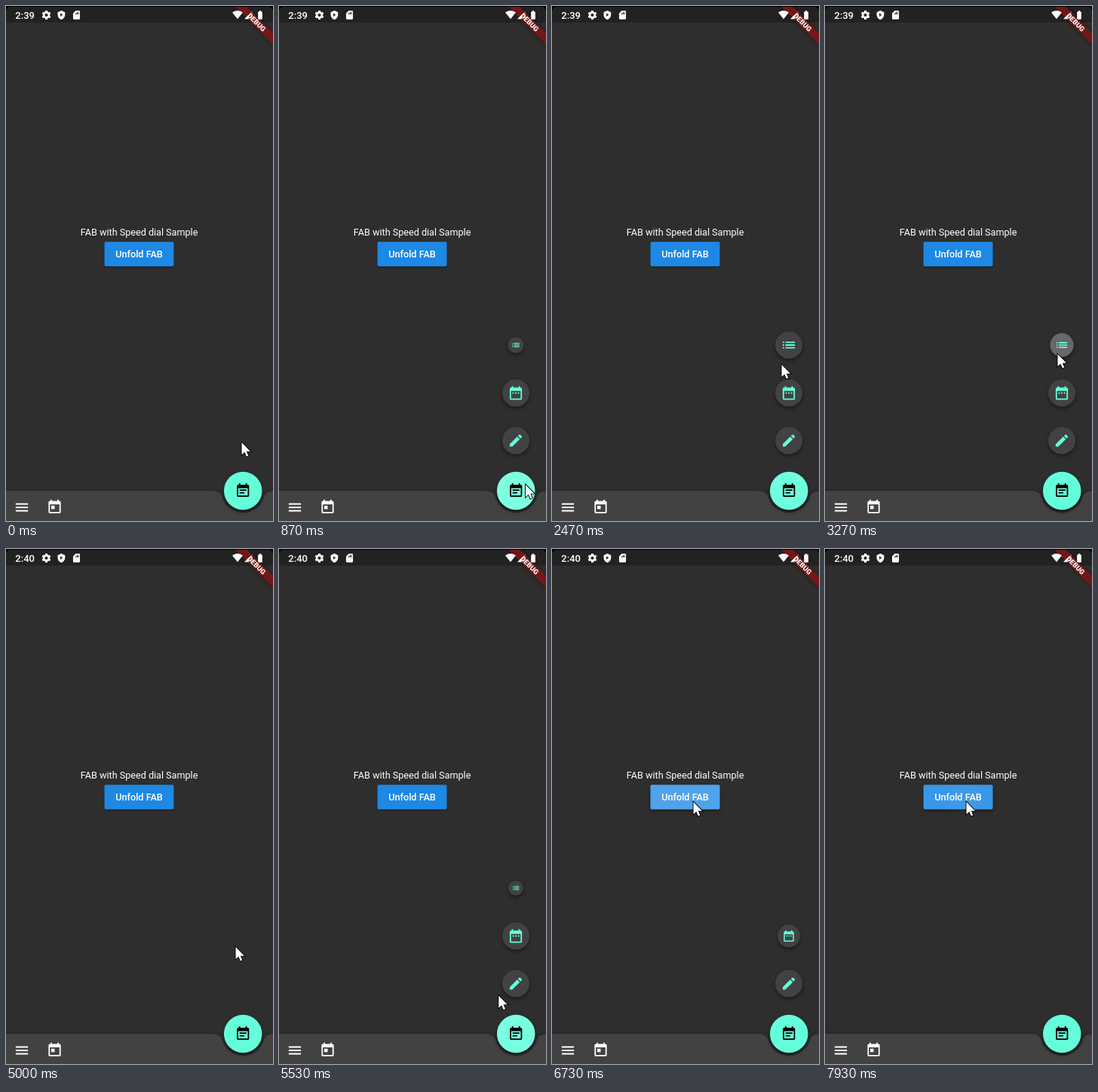
Write an HTML page with a canvas that moves like this. It is 354 px wide and 682 px high and loops after 8 s.

```html
<!DOCTYPE html>
<html lang="en">
<head>
<meta charset="utf-8">
<title>Speed dial</title>
<style>
  html, body { margin: 0; width: 100%; height: 100%; overflow: hidden; background: #000; }
  canvas { display: block; width: 354px; height: 682px; }
</style>
</head>
<body>
<canvas id="stage"></canvas>
<script>
const W = 354, H = 682, LOOP = 8000, STEP = 200 / 3;
const DP = 0.9015;
const TEAL = '#64ffda', SURFACE = '#424242', BODY = '#2e2e2e';
const FONT = 'Roboto, sans-serif';

const canvas = document.getElementById('stage');
const ctx = canvas.getContext('2d');
const dpr = window.devicePixelRatio || 1;
canvas.width = W * dpr;
canvas.height = H * dpr;

const PAGE = 'M19 3h-1V1h-2v2H8V1H6v2H5c-1.1 0-2 .9-2 2v14c0 1.1.9 2 2 2h14c1.1 0 2-.9 2-2V5c0-1.1-.9-2-2-2zM19 19H5V8h14z';
const icons = {
  menu: 'M3 6h18v2H3zM3 11h18v2H3zM3 16h18v2H3z',
  today: PAGE + 'M7 10h5v5H7z',
  note: PAGE + 'M7 10h10v2H7zM7 14h7v2H7z',
  list: 'M3 7h2v2H3zM3 11h2v2H3zM3 15h2v2H3zM7 7h14v2H7zM7 11h14v2H7zM7 15h14v2H7z',
  range: 'M19 4h-1V2h-2v2H8V2H6v2H5c-1.1 0-2 .9-2 2v14c0 1.1.9 2 2 2h14c1.1 0 2-.9 2-2V6c0-1.1-.9-2-2-2zM19 20H5V9h14zM7 11h2v2H7zM11 11h2v2h-2zM15 11h2v2h-2z',
  edit: 'M3 17.25V21h3.75L17.81 9.94l-3.75-3.75zM20.71 7.04c.39-.39.39-1.02 0-1.41l-2.34-2.34c-.39-.39-1.02-.39-1.41 0l-1.83 1.83 3.75 3.75z',
  shield: 'M12 1L3 5v6c0 5.55 3.84 10.74 9 12 5.16-1.26 9-6.45 9-12V5zM9.5 7.5v8l6-4z',
  card: 'M18 2h-8L4 8v12c0 1.1.9 2 2 2h12c1.1 0 2-.9 2-2V4c0-1.1-.9-2-2-2zM9.5 7h1.8v3.5H9.5zM12.5 5h1.8v5.5h-1.8zM15.5 5h1.8v5.5h-1.8z',
  wifi: 'M12 21.5L23.6 7C23.2 6.7 18.7 3 12 3S.8 6.7.4 7z',
  signal: 'M2 22h20V2z',
  battery: 'M15.7 4H14V2h-4v2H8.3C7.6 4 7 4.6 7 5.3v15.4c0 .7.6 1.3 1.3 1.3h7.4c.7 0 1.3-.6 1.3-1.3V5.3c0-.7-.6-1.3-1.3-1.3z'
};
for (const k in icons) icons[k] = new Path2D(icons[k]);
const arrow = new Path2D('M0 0V16.2L3.8 12.7 6.3 18.5 8.8 17.4 6.4 11.7H11.5z');

const FAB = { x: 314.2, y: 642, r: 28 * DP, icon: 'note', presses: [600, 2130, 5230] };
const dials = [
  { x: 314, y: 575.5, icon: 'edit', presses: [1560] },
  { x: 314, y: 512.5, icon: 'range', presses: [] },
  { x: 314, y: 449, icon: 'list', presses: [3110] }
];
const UNFOLD = [660, 2170, 5330], FOLD = [1711, 3256, 6640];
const PART = 80;

// time, x, y of the pointer tip
const route = [
  [340, 312.5, 578], [580, 327, 634], [1220, 327, 634], [1540, 315.3, 561],
  [1800, 315.3, 561], [2060, 313, 632], [2180, 313, 632], [2470, 304.5, 475],
  [2700, 308.5, 463], [2930, 308.5, 463], [3060, 308.5, 461], [3330, 308.5, 461],
  [3600, 304.5, 522], [4930, 304.5, 522], [5000, 304.5, 527], [5200, 312, 634],
  [5400, 312, 634], [5800, 232, 470], [6070, 189.5, 342.5], [6200, 187.5, 335]
];

const clamp = (v, a = 0, b = 1) => Math.min(b, Math.max(a, v));
const ramp = (t, from, len) => clamp((t - from) / len);
const smooth = u => u * u * (3 - 2 * u);
const pulse = (t, start) => Math.min(ramp(t, start, 130), 1 - ramp(t, start + 200, 200));
const glowAt = (b, t) => b.presses.reduce((g, p) => Math.max(g, pulse(t, p)), 0);

function pointerAt(t) {
  const i = route.findIndex(p => p[0] > t);
  if (i < 0) return route[route.length - 1].slice(1);
  if (i === 0) return route[0].slice(1);
  const [ta, xa, ya] = route[i - 1], [tb, xb, yb] = route[i];
  const u = smooth((t - ta) / (tb - ta));
  return [xa + (xb - xa) * u, ya + (yb - ya) * u];
}

// Dials open one after the other from the bottom and close in reverse.
function openness(t) {
  let v = 0;
  UNFOLD.forEach((start, i) => {
    if (t >= start) v = 3 * (ramp(t, start, 3 * PART) - ramp(t, FOLD[i], 3 * PART));
  });
  return v;
}

function shadow(alpha, blur, dy) {
  ctx.shadowColor = `rgba(0,0,0,${alpha})`;
  ctx.shadowBlur = blur * dpr;
  ctx.shadowOffsetY = dy * dpr;
}

function icon(name, x, y, s, color) {
  ctx.save();
  ctx.translate(x - 12 * s, y - 12 * s);
  ctx.scale(s, s);
  ctx.fillStyle = color;
  ctx.fill(icons[name], 'evenodd');
  ctx.restore();
}

function label(str, x, y, font, align = 'left') {
  ctx.font = `${font} ${FONT}`;
  ctx.textAlign = align;
  ctx.fillStyle = '#fff';
  ctx.fillText(str, x, y);
}

function disc(x, y, r, color) {
  ctx.fillStyle = color;
  ctx.beginPath();
  ctx.arc(x, y, r, 0, 7);
  ctx.fill();
}

function roundButton(b, r, color, ink, glow) {
  ctx.save();
  shadow(0.45, 5, 2.5);
  disc(b.x, b.y, r, color);
  ctx.restore();
  if (glow > 0) disc(b.x, b.y, r, `rgba(255,255,255,${glow})`);
}

function gear(x, y) {
  ctx.save();
  ctx.translate(x, y);
  ctx.strokeStyle = ctx.fillStyle = '#fff';
  ctx.lineWidth = 2.6;
  ctx.beginPath();
  ctx.arc(0, 0, 3.4, 0, 7);
  ctx.stroke();
  for (let i = 0; i < 6; i++) {
    ctx.rotate(Math.PI / 3);
    ctx.fillRect(-1.5, -5.9, 3, 2.4);
  }
  ctx.restore();
}

function banner() {
  ctx.save();
  ctx.translate(W, 0);
  ctx.rotate(Math.PI / 4);
  const h = 12 * DP, y = 28 * DP, half = 40 * DP;
  ctx.save();
  shadow(0.5, 5, 0);
  ctx.fillStyle = 'rgba(125,24,24,.9)';
  ctx.fillRect(-half, y, 2 * half, h);
  ctx.restore();
  label('DEBUG', 0, y + h / 2 + 3.3, '900 9.2px', 'center');
  ctx.restore();
}

function statusBar(t) {
  ctx.fillStyle = '#222';
  ctx.fillRect(0, 0, W, 22);
  banner();
  label(t < 3430 ? '2:39' : '2:40', 12.3, 16.5, '500 13px');
  gear(53.5, 12);
  icon('shield', 73.4, 12, 0.54, '#fff');
  icon('card', 93.5, 12, 0.57, '#fff');
  icon('wifi', 307, 11.6, 0.59, '#fff');
  icon('signal', 321.5, 11.8, 0.55, 'rgba(255,255,255,.25)');
  ctx.save();
  ctx.beginPath();
  ctx.rect(314, 0, 7.5, 22);
  ctx.clip();
  icon('signal', 321.5, 11.8, 0.55, '#fff');
  ctx.restore();
  icon('battery', 337, 12, 0.57, '#fff');
}

function bottomBar() {
  const r = 32 * DP, a = r + DP, px = r * r / a, py = Math.sqrt(r * r - px * px);
  const { x, y } = FAB, lip = a + 15 * DP, ang = Math.atan2(py, px);
  ctx.save();
  shadow(0.3, 5, 0);
  ctx.fillStyle = SURFACE;
  ctx.beginPath();
  ctx.moveTo(-9, y);
  ctx.lineTo(x - lip, y);
  ctx.quadraticCurveTo(x - a, y, x - px, y + py);
  ctx.arc(x, y, r, Math.PI - ang, ang, true);
  ctx.quadraticCurveTo(x + a, y, x + lip, y);
  ctx.lineTo(W + 9, H + 9);
  ctx.lineTo(-9, H + 9);
  ctx.fill();
  ctx.restore();
  icon('menu', 21, 664, DP, '#fff');
  icon('today', 64.5, 663.6, DP, '#fff');
}

function centre(t) {
  label('FAB with Speed dial Sample', 176.6, 304.3, '400 12.62px', 'center');
  const box = new Path2D(), hover = ramp(t, 6130, 130);
  box.roundRect(130.5, 312.3, 92, 32.4, 1.8);
  ctx.save();
  shadow(0.4, 2 + 2 * hover, 1 + hover);
  ctx.fillStyle = '#1e88e5';
  ctx.fill(box);
  ctx.restore();
  ctx.fillStyle = `rgba(255,255,255,${0.12 * hover})`;
  ctx.fill(box);
  ctx.save();
  ctx.clip(box);
  const tap = ramp(t, 6530, 250);
  if (tap > 0) disc(187.5, 335, 90 * tap, `rgba(255,255,255,${0.15 * (1 - ramp(t, 6700, 160))})`);
  const hold = ramp(t, 7500, 430);
  if (hold > 0) disc(186, 333, 22 * hold, 'rgba(255,255,255,.025)');
  ctx.restore();
  label('Unfold FAB', 176.5, 333, '500 12.62px', 'center');
}

function speedDial(t, px, py) {
  const open = openness(t);
  dials.forEach((d, i) => {
    const s = clamp(open - i);
    if (s < 0.01) return;
    const r = 20 * DP * s;
    const over = Math.hypot(px - d.x, py - d.y) < 20 * DP ? 0.07 : 0;
    roundButton(d, r, SURFACE, TEAL, over + 0.13 * glowAt(d, t));
    icon(d.icon, d.x, d.y, DP * s, TEAL);
  });
}

function pointer(x, y) {
  ctx.save();
  ctx.translate(x, y);
  ctx.lineWidth = 1.8;
  ctx.strokeStyle = '#000';
  ctx.stroke(arrow);
  ctx.fillStyle = '#fff';
  ctx.fill(arrow);
  ctx.restore();
}

function draw(t) {
  const [px, py] = pointerAt(t);
  ctx.setTransform(dpr, 0, 0, dpr, 0, 0);
  ctx.fillStyle = '#000';
  ctx.fillRect(0, 0, W, H);
  ctx.save();
  ctx.beginPath();
  ctx.roundRect(0, 1, W, H, [7, 7, 0, 0]);
  ctx.clip();
  ctx.fillStyle = BODY;
  ctx.fillRect(0, 0, W, H);
  statusBar(t);
  centre(t);
  bottomBar();
  speedDial(t, px, py);
  roundButton(FAB, FAB.r, TEAL, '#000', 0.25 * glowAt(FAB, t));
  icon(FAB.icon, FAB.x, FAB.y, DP, '#000');
  ctx.restore();
  pointer(px, py);
}

const start = performance.now();
function tick() {
  const t = (performance.now() - start) % LOOP;
  // The screen refreshes fifteen times a second.
  draw(Math.floor((t + 5) / STEP) * STEP);
  requestAnimationFrame(tick);
}
tick();
</script>
</body>
</html>
```
